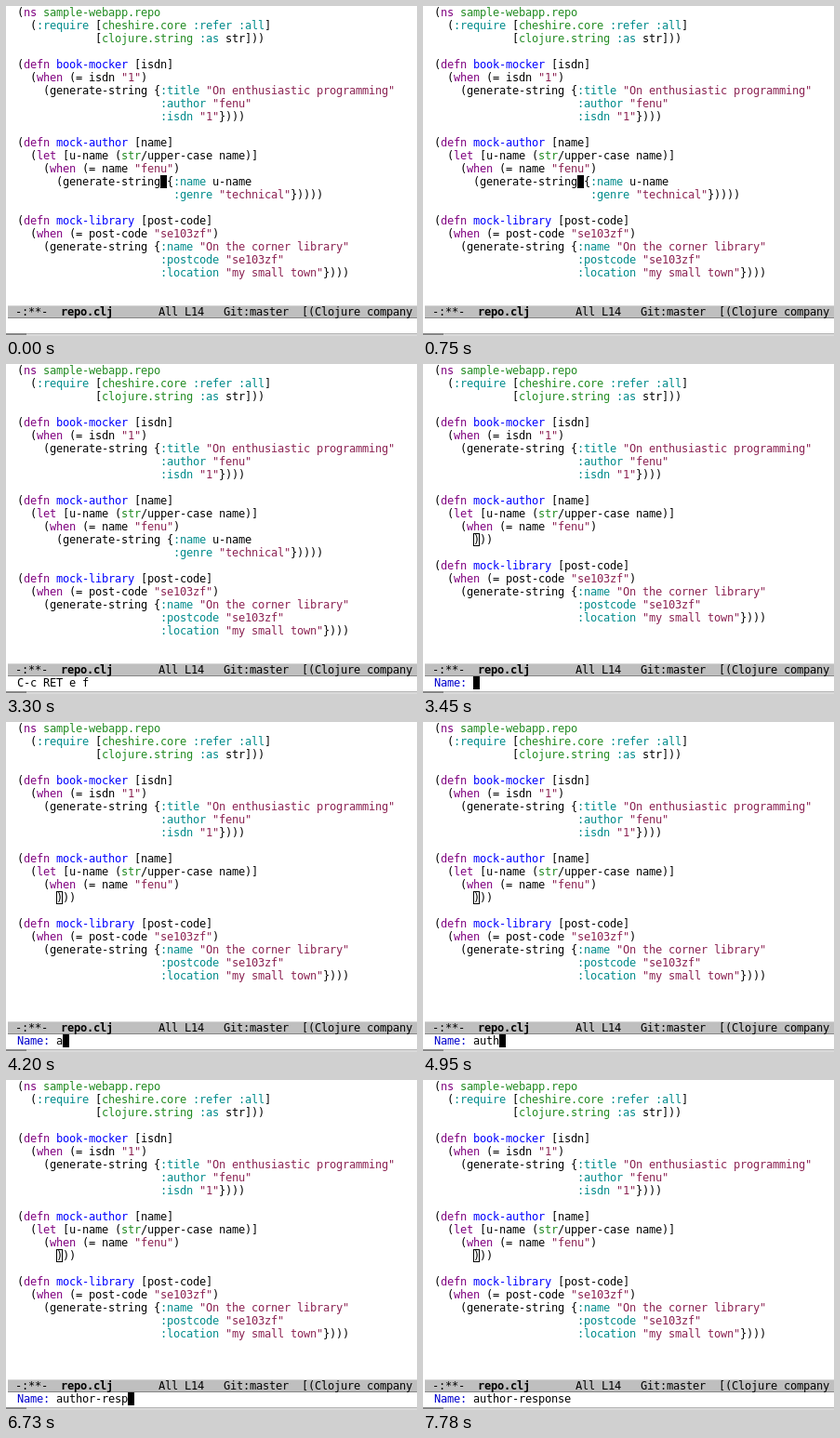
An HTML page with a canvas that plays this animation: 442 px wide and 355 px high, repeating every 8000 ms.

```html
<!DOCTYPE html>
<html lang="en">
<head>
<meta charset="utf-8">
<title>Editor session</title>
<style>
  html, body { margin: 0; width: 442px; height: 355px; overflow: hidden; background: #fff; }
  canvas { display: block; }
</style>
</head>
<body>
<canvas id="stage" width="442" height="355"></canvas>
<script>
const ctx = document.getElementById('stage').getContext('2d');
const LOOP = 8000;
const CELL = 7, LINE = 14, LEFT = 12, BASELINE = 11;
const FONT = '12px "DejaVu Sans Mono", monospace';
const CURSOR_ROW = 13, ECHO_ROW = 24;

const HEAD = `(ns sample-webapp.repo
  (:require [cheshire.core :refer :all]
            [clojure.string :as str]))

(defn book-mocker [isdn]
  (when (= isdn "1")
    (generate-string {:title "On enthusiastic programming"
                      :author "fenu"
                      :isdn "1"})))

(defn mock-author [name]
  (let [u-name (str/upper-case name)]
    (when (= name "fenu")
`;
const BODY = `      (generate-string {:name u-name
                        :genre "technical"}))))
`;
const EXTRACTED = `      )))
`;
const TAIL = `
(defn mock-library [post-code]
  (when (= post-code "se103zf")
    (generate-string {:name "On the corner library"
                      :postcode "se103zf"
                      :location "my small town"})))`;

const BEFORE = (HEAD + BODY + TAIL).split('\n');
const AFTER = (HEAD + EXTRACTED + TAIL).split('\n');

// Each entry: start time, echo text, cursor visible
const CHORD = [
  [0, '', true], [300, '', false], [750, '', true], [1200, '', false],
  [1800, 'C-c-', true], [2100, 'C-c return', true], [2250, 'C-c RET-', false],
  [2700, 'C-c RET e-', false], [2850, 'C-c RET e-', true], [3300, 'C-c RET e f', false]
];
const PROMPT_START = 3450;
const TYPING = [
  [3450, '', true], [4200, 'a', true], [4350, 'au', true], [4800, 'aut', true],
  [4950, 'auth', true], [5240, 'autho', true], [5390, 'author', true],
  [5840, 'author-', true], [6140, 'author-re', true], [6580, 'author-re', false],
  [6730, 'author-resp', true], [7030, 'author-respon', true],
  [7180, 'author-respons', true], [7330, 'author-response', true],
  [7780, 'author-response', false]
];

const TOKEN = /"[^"]*"|:[a-z]+|(?<=\()(?:ns|defn|let|when)\b|(?<=defn )[\w-]+|[\w-]+\.\w+|str(?=\/)|./g;

function tokenColor(token, before) {
  if (token[0] === '"') return '#8b2252';
  if (/^:[a-z]/.test(token)) return '#008b8b';
  if (/^(ns|defn|let|when)$/.test(token)) return '#7f007f';
  if (token.length > 1 && before.endsWith('defn ')) return '#0000ff';
  if (token === 'str' || /\w\.\w/.test(token)) return '#228b22';
  return '#000';
}

function fill(color, x, y, w, h) {
  ctx.fillStyle = color;
  ctx.fillRect(x, y, w, h);
}

// Glyphs sit on the editor's whole-pixel character grid.
function write(text, x, row, color = '#000', weight = '') {
  ctx.font = weight + FONT;
  ctx.fillStyle = color;
  [...text].forEach((glyph, i) => {
    if (glyph !== ' ') ctx.fillText(glyph, x + i * CELL, row * LINE + BASELINE);
  });
}

function drawCode(lines) {
  lines.forEach((line, row) => {
    for (const { 0: token, index } of line.matchAll(TOKEN)) {
      write(token, LEFT + index * CELL, row, tokenColor(token, line.slice(0, index)));
    }
  });
}

function drawCursor(col, row) {
  fill('#000', LEFT + col * CELL, row * LINE, CELL, LINE);
}

function drawHollowCursor(col, row) {
  ctx.strokeStyle = '#000';
  ctx.lineWidth = 1;
  ctx.strokeRect(LEFT + col * CELL + 0.5, row * LINE + 0.5, CELL - 1, LINE - 1);
}

function drawFrame() {
  fill('#bfbfbf', 2, 322, 440, 14);
  fill('#d8d8d8', 2, 322, 440, 1);
  fill('#858585', 2, 335, 440, 1);
  write('-:**-', 10, 23);
  write('repo.clj', 59, 23, '#000', 'bold ');
  write('All L14   Git:master  [(Clojure company', 164, 23);

  fill('#b4b4b4', 0, 352, 442, 1);
  fill('#dadada', 0, 353, 442, 2);
  fill('#858585', 0, 352, 22, 2);
}

function stateAt(states, t) {
  return states.findLast(([start]) => start <= t);
}

function draw(t) {
  const prompting = t >= PROMPT_START;
  const [, text, cursorOn] = stateAt(prompting ? TYPING : CHORD, t);

  fill('#fff', 0, 0, 442, 355);
  drawCode(prompting ? AFTER : BEFORE);
  drawFrame();

  if (prompting) {
    const label = 'Name: ';
    drawHollowCursor(6, CURSOR_ROW);
    write(label, LEFT, ECHO_ROW, '#0000cd');
    write(text, LEFT + label.length * CELL, ECHO_ROW);
    if (cursorOn) drawCursor(label.length + text.length, ECHO_ROW);
  } else {
    write(text, LEFT, ECHO_ROW);
    if (cursorOn) drawCursor(22, CURSOR_ROW);
  }
}

const startTime = performance.now();
function tick() {
  draw((performance.now() - startTime) % LOOP);
  requestAnimationFrame(tick);
}
tick();
</script>
</body>
</html>
```
